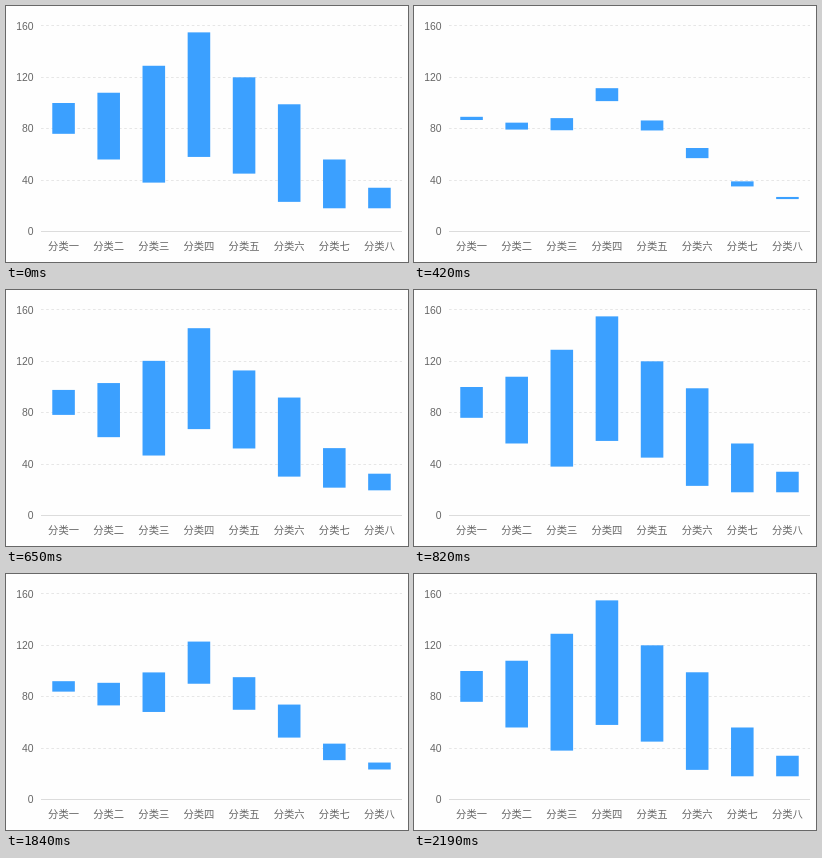
Animation of 402 by 256 pixels, one loop 3270 ms. Source, as an HTML page with a canvas:

```html
<!DOCTYPE html>
<html lang="zh-CN">
<head>
<meta charset="utf-8">
<title>区间柱状图</title>
<style>
  html, body { margin: 0; width: 100%; height: 100%; overflow: hidden; background: #fefefe; }
  canvas { display: block; }
</style>
</head>
<body>
<canvas id="stage" width="402" height="256"></canvas>
<script>
const ctx = document.getElementById('stage').getContext('2d');
const LOOP = 3270, BLANK = 120, DELAY = 36, GROW = 450, TICKS = 8;
// Each replay: when the chart clears, and the length of one animation step.
const replays = [{ start: 240, step: 58 }, { start: 1600, step: 58.5 }];
const ranges = [[76, 100], [56, 108], [38, 129], [58, 155], [45, 120], [23, 99], [18, 56], [18, 34]];
const LEFT = 35, RIGHT = 396, BASE = 225.4, UNIT = 1.284;
const band = (RIGHT - LEFT) / ranges.length;
const yOf = value => BASE - value * UNIT;

function line(y, color, dash) {
  ctx.strokeStyle = color;
  ctx.setLineDash(dash);
  ctx.beginPath();
  ctx.moveTo(LEFT, y);
  ctx.lineTo(RIGHT, y);
  ctx.stroke();
}

function drawAxes() {
  ctx.lineWidth = 1;
  ctx.fillStyle = '#666';
  ctx.textAlign = 'right';
  ctx.font = '10.4px "Liberation Sans", Arial, sans-serif';
  for (let value = 0; value <= 160; value += 40) {
    const y = Math.floor(yOf(value)) + 0.5;
    if (value) line(y, '#e6e6e6', [2.6, 2.6]);
    else line(y, '#dcdcdc', []);
    ctx.fillText(value, 27.5, yOf(value) + 3.8);
  }
  ctx.textAlign = 'center';
  ctx.font = '10.3px "Noto Sans CJK SC", "Noto Sans CJK", sans-serif';
  [...'一二三四五六七八'].forEach((n, i) =>
    ctx.fillText('分类' + n, LEFT + band * (i + 0.5), 244));
}

// Bars open symmetrically from the middle of their range.
function drawBars(progress) {
  ctx.fillStyle = '#3ba0ff';
  ranges.forEach(([low, high], i) => {
    const height = (high - low) * UNIT * progress;
    ctx.fillRect(LEFT + band * (i + 0.25), yOf((low + high) / 2) - height / 2, band / 2, height);
  });
}

// Returns bar growth from 0 to 1, or null while the chart is cleared.
function progressAt(time) {
  const replay = replays.findLast(r => time >= r.start);
  if (!replay) return 1;
  const elapsed = time - replay.start - BLANK;
  if (elapsed < 0) return null;
  const tickTime = k => Math.round(k * replay.step / 10) * 10;
  let tick = 0;
  while (tick < TICKS && tickTime(tick + 1) <= elapsed) tick++;
  if (tick === TICKS) return 1;
  const x = Math.max(0, (tickTime(tick) - DELAY) / GROW);
  return x * (2 - x);
}

function render(now) {
  const progress = progressAt(now % LOOP);
  ctx.fillStyle = '#fefefe';
  ctx.fillRect(0, 0, 402, 256);
  if (progress !== null) {
    drawAxes();
    drawBars(progress);
  }
}

const begin = performance.now();
function loop() {
  render(performance.now() - begin);
  requestAnimationFrame(loop);
}
loop();
</script>
</body>
</html>
```
